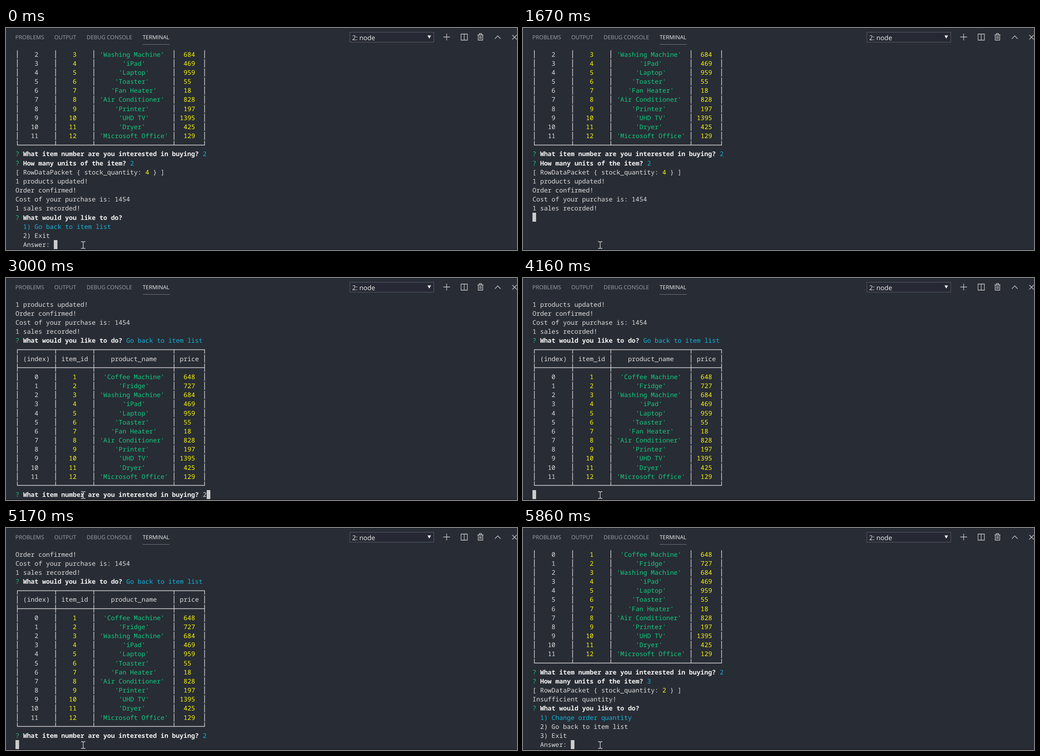
Animation of 1133 by 494 pixels, one loop 8 s. Source, as an HTML page:

```html
<!DOCTYPE html>
<html lang="en">
<head>
<meta charset="utf-8">
<title>Terminal session</title>
<style>
  html, body { margin: 0; width: 100%; height: 100%; overflow: hidden; background: #282c34; }
  svg { display: block; width: 1133px; height: 494px; }
  text { white-space: pre; text-rendering: geometricPrecision; }
  .tabs { font: 12.3px "Open Sans", "Noto Sans", sans-serif; fill: #9da1aa; }
  .tabs .active { fill: #eceef0; }
  .pick { font: 14.6px "Open Sans", "Noto Sans", sans-serif; fill: #f0f0f0; }
  .icons { fill: none; stroke: #c8c8c8; stroke-width: 1.3; }
  .icons .thin { stroke-width: 1; }
  #term { font: 500 14.12px "Noto Sans Mono", "DejaVu Sans Mono", monospace; }
  #term g { display: none; }
  #term g.on { display: inline; }
  .w { fill: #dedede; }
  .b { fill: #f4f4f4; font-weight: 700; }
  .g { fill: #10cc80; }
  .c { fill: #14b4dc; }
  .y { fill: #fafa0a; }
  .grid { fill: none; stroke: #d8d6da; stroke-width: 1.4; }
  .cursor { fill: #cccccc; }
  .beam { fill: none; stroke: #dcdcdc; stroke-width: 1.3; }
</style>
</head>
<body>
<svg viewBox="0 0 1133 494">
  <rect width="1133" height="494" fill="#282c34"/>
  <rect width="1133" height="1" fill="#1f2228"/>
  <rect y="492" width="1133" height="2" fill="#1f2027"/>
  <g class="tabs">
    <text x="20.8" y="25.3">PROBLEMS</text>
    <text x="107" y="25.3">OUTPUT</text>
    <text x="178.7" y="25.3">DEBUG CONSOLE</text>
    <text x="303" y="25.3" class="active">TERMINAL</text>
  </g>
  <rect x="303" y="36" width="60" height="1" fill="#74777e"/>
  <rect x="762.5" y="9.5" width="186" height="22" fill="#262933" stroke="#5a5d66"/>
  <text class="pick" x="767.5" y="27">2: node</text>
  <path d="M934.5 16.5h8l-4 7z" fill="#f0f0f0"/>
  <g class="icons">
    <path d="M969.5 20h15M977 12.5v15"/>
    <path d="M1009 13.5h14v13.5h-14zM1016 13.5v13.5"/>
    <path d="M1045.5 15.5h13M1049.5 15v-2.5h5v2.5M1047 15.5v11.5h10v-11.5"/>
    <path class="thin" d="M1050 18v6.5M1052 18v6.5M1054 18v6.5"/>
    <path d="M1084 24l6.3-6.5 6.3 6.5"/>
    <path d="M1122.5 15.5l10 10M1132.5 15.5l-10 10"/>
  </g>
  <g id="term"></g>
  <path class="beam" d="M166.5 475.5h3.2l1.5 1.2 1.5-1.2h3.2M171.2 476.5v13M166.5 490.5h3.2l1.5-1.2 1.5 1.2h3.2"/>
</svg>
<script>
const LEFT = 21, TOP = 48.4, CELL = 8.472, ROW = 20.17, LOOP = 8000;
const widths = [9, 9, 20, 7];
const stops = [0, 10, 20, 41, 49];
const rules = { top: [10, 19.2], mid: [1, 19.2], end: [1, 10], bar: [1, 19.2] };

// Lines are "~" separated runs, each led by its style letter; a table line also names its rule.
const tableLine = (cells, styles) => ({
  rule: "bar",
  text: cells.map((cell, i) => {
    const pad = Math.floor((widths[i] - cell.length) / 2);
    return "~w ~" + styles[i] + " ".repeat(pad) + cell.padEnd(widths[i] - pad);
  }).join("")
});

const stock = [
  ["Coffee Machine", 648], ["Fridge", 727], ["Washing Machine", 684], ["iPad", 469],
  ["Laptop", 959], ["Toaster", 55], ["Fan Heater", 18], ["Air Conditioner", 828],
  ["Printer", 197], ["UHD TV", 1395], ["Dryer", 425], ["Microsoft Office", 129]
];
const table = [
  { rule: "top", text: "" },
  tableLine(["(index)", "item_id", "product_name", "price"], "wwww"),
  { rule: "mid", text: "" },
  ...stock.map(([name, price], i) => tableLine([`${i}`, `${i + 1}`, `'${name}'`, `${price}`], "wygy")),
  { rule: "end", text: "" }
];

const ask = (question, answer = "", style = "c") => `~g? ~b${question} ~${style}${answer}`;
const whichItem = (...a) => ask("What item number are you interested in buying?", ...a);
const howMany = (...a) => ask("How many units of the item?", ...a);
const whatNext = (...a) => ask("What would you like to do?", ...a);
const packet = n => `~w[ RowDataPacket { stock_quantity: ~y${n}~w } ]`;
const menu = (first, rest, answer = "") =>
  [whatNext(), `~c  1) ${first}`, ...rest.map((r, i) => `~w  ${i + 2}) ${r}`), `~w  Answer: ${answer}`];

const sold = [
  ...table, whichItem("2"), howMany("2"), packet(4), "~w1 products updated!",
  "~wOrder confirmed!", "~wCost of your purchase is: 1454", "~w1 sales recorded!"
];
const back = "Go back to item list";
const listed = [...sold, whatNext(back), ...table];
const chosen = [...listed, whichItem("2")];
const refused = [
  ...chosen, howMany("3"), packet(2), "~wInsufficient quantity!",
  ...menu("Change order quantity", [back, "Exit"])
];

// [start in ms, first visible line, lines]; the cursor follows the last line.
const screens = [
  [0, 5, [...sold, ...menu(back, ["Exit"])]],
  [830, 5, [...sold, ""]],
  [900, 5, [...sold, ...menu(back, ["Exit"], "1")]],
  [1670, 5, [...sold, ""]],
  [1760, 19, [...listed, whichItem()]],
  [2920, 19, [...listed, ""]],
  [3000, 19, [...listed, whichItem("2", "w")]],
  [4160, 19, [...listed, ""]],
  [4240, 20, [...chosen, howMany()]],
  [5170, 20, [...chosen, ""]],
  [5250, 20, [...chosen, howMany("3", "w")]],
  [5780, 20, [...chosen, ""]],
  [5860, 27, refused]
];

function add(parent, tag, attrs, text = "") {
  const el = document.createElementNS("http://www.w3.org/2000/svg", tag);
  for (const key in attrs) el.setAttribute(key, attrs[key]);
  el.textContent = text;
  return parent.appendChild(el);
}

function drawRule(group, kind, top) {
  const xs = stops.map(s => LEFT + (s + 0.5) * CELL);
  const y = Math.round(top + 10.5) - 0.5;
  const [from, to] = rules[kind];
  const y1 = kind === "top" ? y : top + from;
  const y2 = kind === "end" ? y : top + to;
  let d = xs.map(x => `M${x.toFixed(2)} ${y1.toFixed(1)}V${y2.toFixed(1)}`).join("");
  if (kind !== "bar") d += `M${xs[0] - 0.6} ${y}H${xs[4] + 0.6}`;
  add(group, "path", { class: "grid", d });
}

function drawLine(group, line, row) {
  const top = TOP + row * ROW;
  if (line.rule) drawRule(group, line.rule, top);
  let col = 0;
  for (const run of (line.text ?? line).split("~").slice(1)) {
    const text = run.slice(1), lead = text.length - text.trimStart().length;
    if (text.trim()) {
      add(group, "text", {
        class: run[0], x: (LEFT + (col + lead) * CELL).toFixed(2), y: (top + 15.1).toFixed(2)
      }, text.trim());
    }
    col += text.length;
  }
  return col;
}

const term = document.getElementById("term");
const groups = screens.map(([, first, lines]) => {
  const group = add(term, "g", {});
  let col = 0;
  const shown = lines.slice(first);
  shown.forEach((line, row) => { col = drawLine(group, line, row); });
  add(group, "rect", {
    class: "cursor", x: Math.round(LEFT + col * CELL),
    y: Math.round(TOP + (shown.length - 1) * ROW), width: 8, height: 20
  });
  return group;
});

let current = -1;
function tick() {
  const time = performance.now() % LOOP;
  const next = screens.filter(([start]) => start <= time).length - 1;
  if (next !== current) {
    groups.forEach((group, i) => group.classList.toggle("on", i === next));
    current = next;
  }
  requestAnimationFrame(tick);
}
tick();
</script>
</body>
</html>
```
